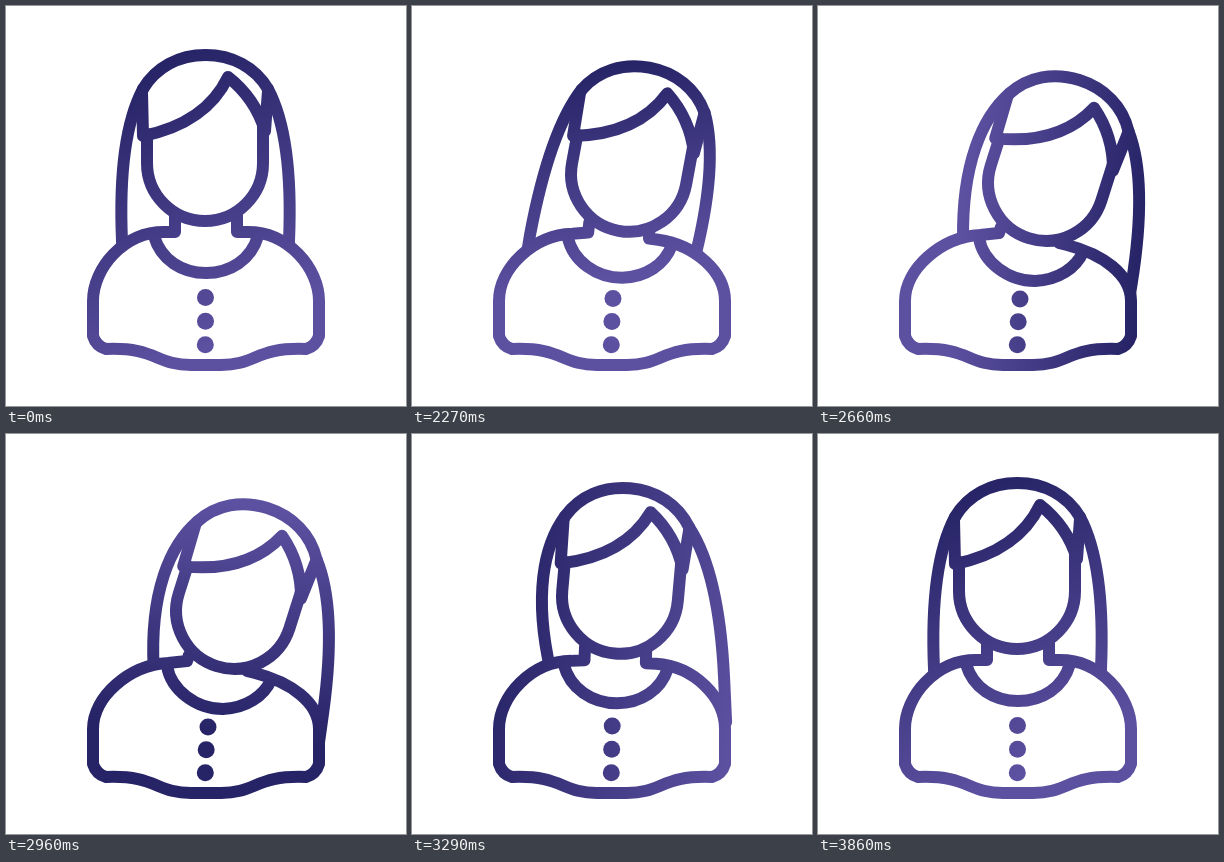
Animation of 400 by 400 pixels, one loop 3890 ms. Source, as an HTML page:

```html
<!DOCTYPE html>
<html lang="en">
<head>
<meta charset="utf-8">
<title>Tilting head</title>
<style>
html, body { margin: 0; width: 100%; height: 100%; overflow: hidden; background: #fff; }
svg { display: block; width: 100vw; height: 100vh; }
.line { fill: none; stroke: #fff; stroke-width: 12; stroke-linecap: round; stroke-linejoin: round; }
.solid { fill: #000; }
</style>
</head>
<body>
<svg viewBox="0 0 400 400">
  <defs>
    <linearGradient id="ink" gradientUnits="userSpaceOnUse">
      <stop offset="0" stop-color="#262366"/>
      <stop offset="1" stop-color="#5c50a0"/>
    </linearGradient>
    <mask id="figure" maskUnits="userSpaceOnUse" x="0" y="0" width="400" height="400">
      <g class="line">
        <path id="strandL"/>
        <path id="strandR"/>
        <path id="body" class="solid"/>
        <path id="collar"/>
        <g id="head">
          <path class="solid" d="M141 128V157A58 58 0 0 0 257 157V115"/>
          <path d="M137 83C150 61 173 49 199.5 49S249 61 262 83"/>
          <path d="M136 86L137 130Q200 117 222 71Q249 92 259 125L262 85"/>
        </g>
      </g>
      <g fill="#fff">
        <circle id="button1" r="8.5"/>
        <circle id="button2" r="8.5"/>
        <circle cx="199.3" cy="338.7" r="8.5"/>
      </g>
    </mask>
  </defs>
  <rect width="400" height="400" fill="url(#ink)" mask="url(#figure)"/>
</svg>
<script>
const LOOP = 3890, REST_END = 2030, STEP = 30;
const PIVOT = [149.5, 261], MAX_TILT = 17.6;
const $ = id => document.getElementById(id);

// Upright and tilted outlines, blended number by number.
const hem = 'V330Q310 340 300 343C250 341 250 359 215 359H185C150 359 150 341 100 343Q90 340 87 330V295';
const BODY = [
  `M231 209L231 226L242 226C282 226 313 262 313 295${hem}C87 262 118 226 158 226L169 226L169 209`,
  `M242 230L241 237L249 239C284 248 313 268 313 295${hem}C87 263 123 231 162 229L181 227L183 221`
];
const COLLAR = [
  'M148 230C155 254 176 267 200 267C224 267 245 254 252 230',
  'M161 232C165 256 190 275 217 275C240 274 258 262 265 246'
];

// Strand points; grip is how far each follows the head instead of swinging freely.
const STRAND_L = { points: [[137, 83], [120, 115], [113, 165], [116, 235], [118, 280]], grip: [0, 1.3, 1, 0.27, 0.27] };
const STRAND_R = { points: [[262, 83], [279, 115], [286, 165], [283, 235], [281, 280]], grip: [0, 0, 0, 0, 0] };

// Hair swing: time, degrees
const SWING = [[2000, 0], [2270, 12.2], [2420, 14], [2540, 11], [2780, 3.5],
  [2960, 5.4], [3290, -5.2], [3540, 1.3], [3740, 0.2], [3860, 0]];

// Gradient: time, centre x, centre y, direction, half length
const SHADE = [[2030, 195, 190, 65, 140], [2270, 205, 162, 78, 105], [2450, 262, 125, 122, 75],
  [2960, 215, 185, 277, 115], [3290, 210, 200, 372, 130], [3860, 195, 190, 425, 140]];

const mix = (a, b, k) => a + (b - a) * k;

function ease(t, from, to) {
  const p = Math.min(1, Math.max(0, (t - from) / (to - from)));
  return p * p * (3 - 2 * p);
}

function blend([a, b], k) {
  const target = b.match(/[\d.]+/g);
  let i = 0;
  return a.replace(/[\d.]+/g, n => mix(+n, +target[i++], k).toFixed(2));
}

function segment(keys, t) {
  let i = 0;
  while (i < keys.length - 2 && t >= keys[i + 1][0]) i++;
  const a = keys[i], b = keys[i + 1];
  return [i, Math.min(1, Math.max(0, (t - a[0]) / (b[0] - a[0])))];
}

function curve(keys, t) {
  const [i, p] = segment(keys, t);
  const slope = j => {
    const a = keys[j - 1], b = keys[j + 1];
    return a && b ? (b[1] - a[1]) / (b[0] - a[0]) : 0;
  };
  const [t0, v0] = keys[i], [t1, v1] = keys[i + 1], span = t1 - t0;
  const q = 1 - p;
  return v0 * q * q * (1 + 2 * p) + v1 * p * p * (3 - 2 * p)
    + span * p * q * (slope(i) * q - slope(i + 1) * p);
}

function rotateAbout([x, y], [px, py], degrees) {
  const a = degrees * Math.PI / 180, dx = x - px, dy = y - py;
  return [px + dx * Math.cos(a) - dy * Math.sin(a), py + dx * Math.sin(a) + dy * Math.cos(a)];
}

function set(id, attrs) {
  for (const name in attrs) $(id).setAttribute(name, attrs[name]);
}

function strand({ points, grip }, tilt, swing) {
  const root = points[0], [x, y] = rotateAbout(root, PIVOT, tilt);
  const [a, b, c, d, e] = points.map((point, i) => {
    const [px, py] = rotateAbout(point, root, mix(swing, tilt, grip[i]));
    return [px + x - root[0], py + y - root[1]];
  });
  return `M${a}C${b} ${c} ${d}L${e}`;
}

function shade(t) {
  const [i, p] = segment(SHADE, t);
  const [, x, y, angle, half] = SHADE[i].map((v, j) => mix(v, SHADE[i + 1][j], p));
  const dx = half * Math.cos(angle * Math.PI / 180), dy = half * Math.sin(angle * Math.PI / 180);
  set('ink', { x1: x - dx, y1: y - dy, x2: x + dx, y2: y + dy });
}

function draw(time) {
  const t = time < REST_END ? 0 : REST_END + Math.floor((time - REST_END) / STEP) * STEP;
  const k = ease(t, 1985, 2490) - ease(t, 3000, 3450);
  const tilt = MAX_TILT * k, swing = curve(SWING, t);
  set('head', { transform: `rotate(${tilt} ${PIVOT})` });
  set('strandL', { d: strand(STRAND_L, tilt, swing) });
  set('strandR', { d: strand(STRAND_R, tilt, swing) });
  set('body', { d: blend(BODY, k) });
  set('collar', { d: blend(COLLAR, k) });
  set('button1', { cx: mix(199.5, 202, k), cy: mix(291.5, 293, k) });
  set('button2', { cx: mix(199.5, 200.2, k), cy: mix(315.2, 315.7, k) });
  shade(t);
}

const start = performance.now();
function tick() {
  draw((performance.now() - start) % LOOP);
  requestAnimationFrame(tick);
}
tick();
</script>
</body>
</html>
```
